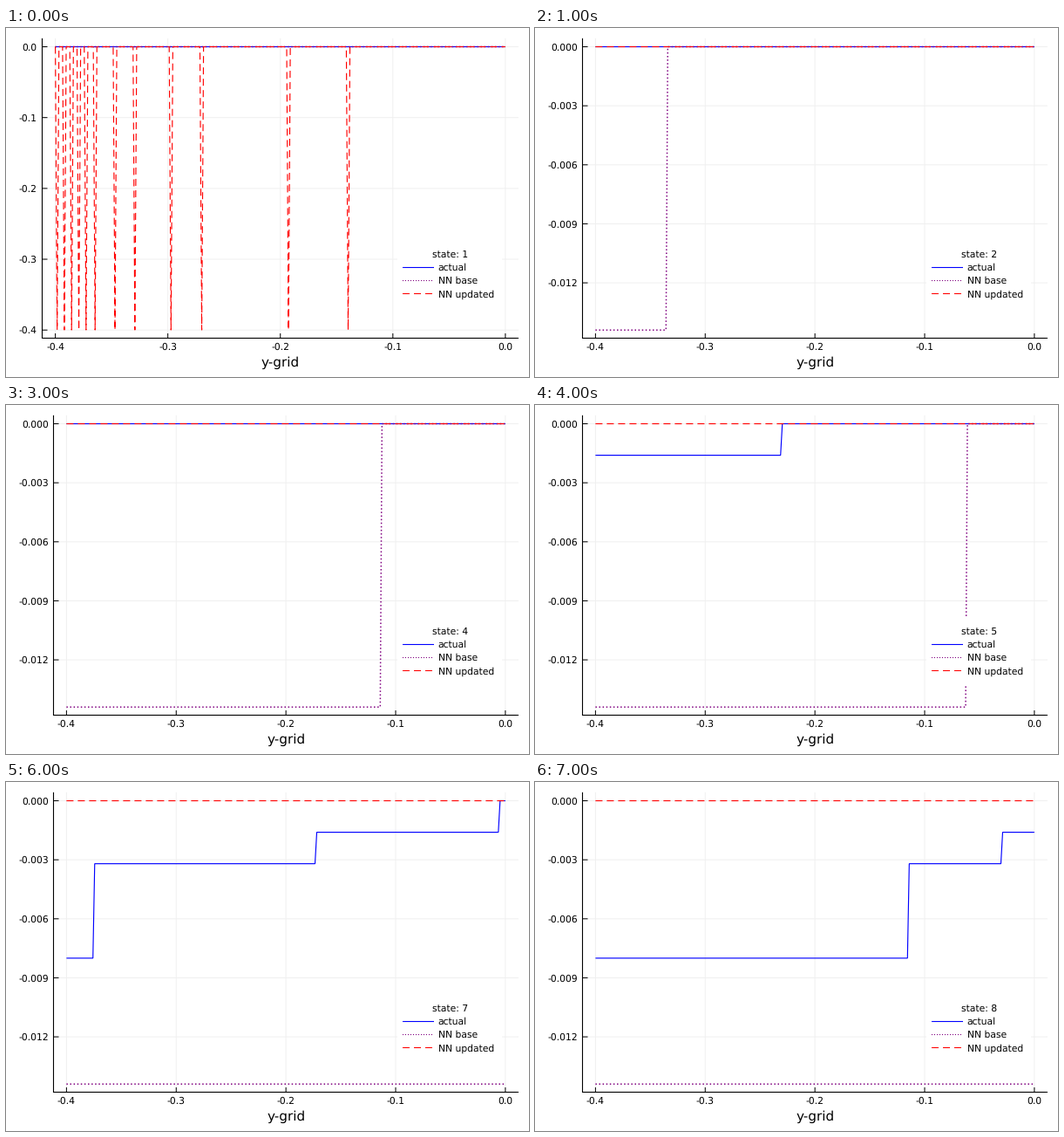
These frames come from a looping animation (600x400 px, 8000 ms). A matplotlib script:

```python
import matplotlib.pyplot as plt
from matplotlib.animation import FuncAnimation
from matplotlib.patches import Rectangle

plt.rcParams["font.family"] = "DejaVu Sans"
plt.rcParams["text.hinting"] = "none"
plt.rcParams["lines.scale_dashes"] = False

W, H, DPI = 600, 400, 100
PX = 72 / DPI                      # points per pixel
TOP, BOTTOM = 21.5, 346.2          # pixel rows of the highest and lowest value
AXIS_TOP, AXIS_Y, RIGHT = 11.8, 355.5, 588
X_ZERO = 572.9
LAST = 249                         # index of the last grid point
BLUE, PURPLE, RED = "#0000ff", "#800080", "#ff0000"
DASH, DOT, FINE_DOT = (8, 5), (1.5, 2.6), (1, 2)

# Grid points where the lines jump
SPIKES = [1, 5, 9, 13, 17, 22, 33, 44, 64, 81, 129, 162]
BASE_STEP = {2: 40, 3: 113, 4: 178, 5: 210, 6: 245}
ACTUAL_STEPS = {
    5: [(-0.0016, 105), (0, LAST)],
    6: [(-0.0016, 199), (0, LAST)],
    7: [(-0.008, 15), (-0.0032, 141), (-0.0016, 245), (0, LAST)],
    8: [(-0.008, 177), (-0.0032, 230), (-0.0016, LAST)],
}

fig = plt.figure(figsize=(W / DPI, H / DPI), dpi=DPI, facecolor="white")
ax = fig.add_axes([0, 0, 1, 1])


def line(xs, ys, color, width=1.15, dash=None, z=3):
    style = (0, [d * PX for d in dash]) if dash else "-"
    ax.plot(xs, ys, color=color, lw=width * PX, ls=style, zorder=z, snap=False,
            solid_capstyle="butt", dash_capstyle="butt",
            solid_joinstyle="miter", dash_joinstyle="miter")


def label(x, y, text, size=10.8, ha="center"):
    ax.text(x, y, text, fontsize=size * PX, ha=ha, va="baseline",
            color="black", zorder=8)


def column(k, left):
    return left + (X_ZERO - left) * k / LAST


def row(value, low):
    return TOP + (BOTTOM - TOP) * value / low


def stairs(steps, left, low):
    """Pixel path through (value, last grid point) pieces."""
    xs, ys, start = [], [], 0
    for value, end in steps:
        xs += [column(start, left), column(end, left)]
        ys += [row(value, low)] * 2
        start = end + 1
    return xs, ys


def draw_axes(spine, left, step, low, digits):
    for i in range(5):
        x = left + (X_ZERO - left) * i / 4
        line([x, x], [AXIS_TOP, AXIS_Y], "#f0f0f0", 1, z=1)
        line([x, x], [AXIS_Y - 5.5, AXIS_Y], "black", 1, z=2)
        label(x, 369, f"{(i - 4) / 10:.1f}")

        value = -step * i if i else 0
        y = row(value, low)
        line([spine, RIGHT], [y, y], "#f0f0f0", 1, z=1)
        line([spine, spine + 6], [y, y], "black", 1, z=2)
        label(spine - 5.8, y + 4, f"{value:.{digits}f}", ha="right")
    line([spine, spine], [AXIS_TOP, AXIS_Y + 0.5], "black", 1.1, z=2)
    line([spine, RIGHT], [AXIS_Y, AXIS_Y], "black", 1.1, z=2)
    label((spine + RIGHT) / 2, 388.2, "y-grid", 15.2)


def draw_legend(state):
    ax.add_patch(Rectangle((449, 243), 120, 77.5, fc="white", ec="none", zorder=6))
    label(509.5, 263.2, f"state: {state}")
    rows = [("actual", BLUE, None), ("NN base", PURPLE, FINE_DOT),
            ("NN updated", RED, DASH)]
    for i, (name, color, dash) in enumerate(rows):
        y = 274.5 + 15 * i
        line([455, 491], [y, y], color, 1.1, dash, z=7)
        label(495.5, y + 3.8, name, ha="left")


def draw_first():
    left, low = 56.6, -0.4
    draw_axes(41.5, left, 0.1, low, 1)
    line([left, X_ZERO], [TOP, TOP], BLUE, z=3)
    line([left, X_ZERO], [TOP, TOP], PURPLE, 1.5, DOT, z=4)
    ks, ys = [0], [TOP]
    for k in SPIKES:
        ks += [k - 1, k, k + 1]
        ys += [TOP, BOTTOM, TOP]
    xs = [column(k, left) for k in ks + [LAST]]
    line(xs, ys + [TOP], RED, 1.15, DASH, z=5)


def draw_later(state):
    left, low = 69.4, -0.0144
    draw_axes(54.5, left, 0.003, low, 3)
    actual = ACTUAL_STEPS.get(state, [(0, LAST)])
    base = [(low, LAST)]
    if state in BASE_STEP:
        base = [(low, BASE_STEP[state]), (0, LAST)]
    line(*stairs(actual, left, low), BLUE, z=3)
    line(*stairs(base, left, low), PURPLE, 1.5, DOT, z=4)
    line([left, X_ZERO], [TOP, TOP], RED, 1.15, DASH, z=5)


def draw(frame):
    ax.clear()
    ax.set_xlim(0, W)
    ax.set_ylim(H, 0)
    ax.axis("off")
    state = frame + 1
    if state == 1:
        draw_first()
    else:
        draw_later(state)
    draw_legend(state)
    return []


anim = FuncAnimation(fig, draw, frames=8, interval=1000, repeat=True,
                     repeat_delay=0, init_func=lambda: [], blit=False)
plt.show()
```
